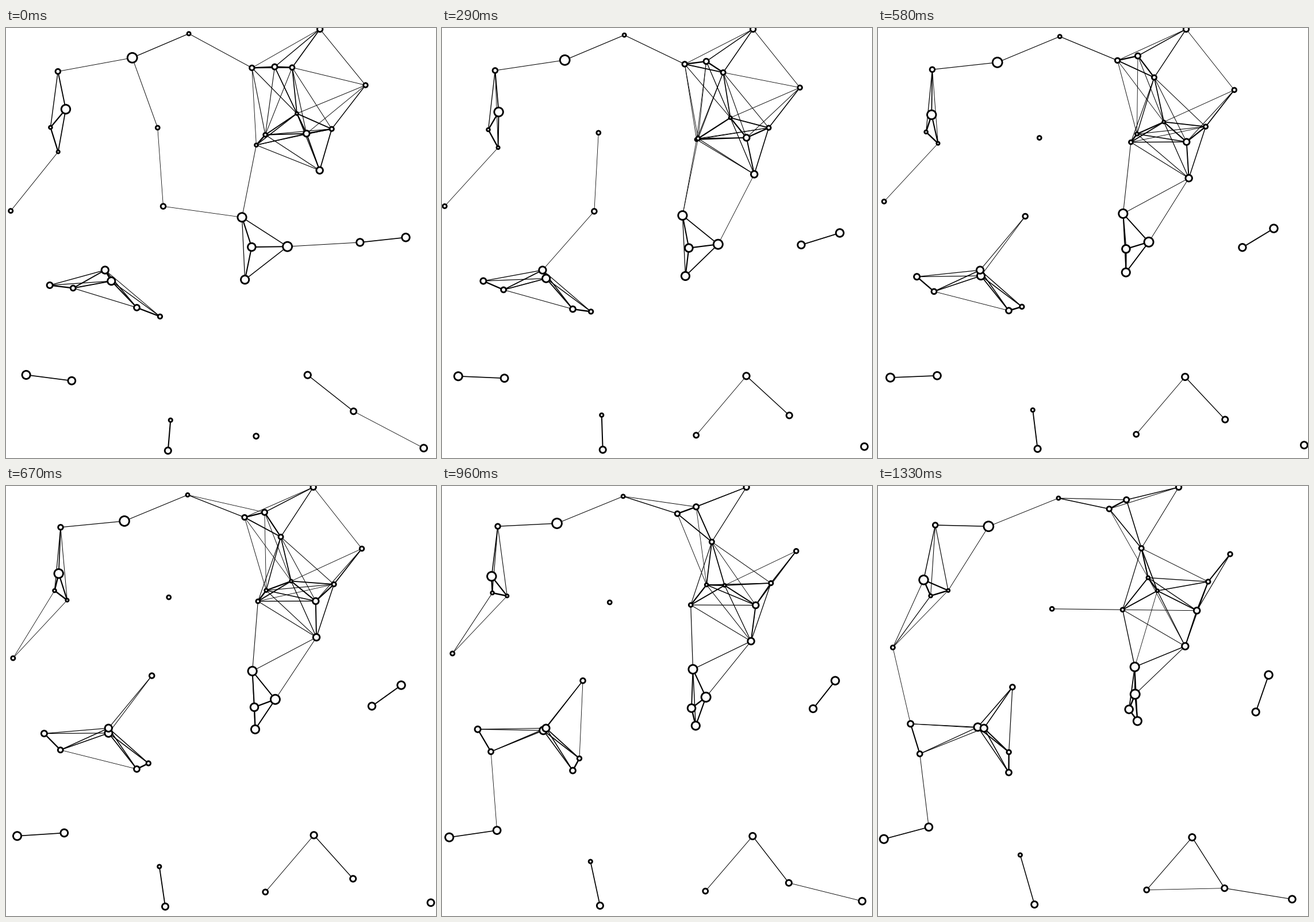
A matplotlib script that plays this animation: 748x748 px, repeating every 1.37 s.

```python
import matplotlib.pyplot as plt
import numpy as np
from matplotlib.animation import FuncAnimation
from matplotlib.collections import LineCollection

SIZE = 748             # stage side in pixels
PX = 0.72              # points per pixel at 100 dpi
REACH = 138.5          # nodes closer than this are linked
STEPS = 32             # moves in one loop
STEPS_PER_TICK = 0.24  # 24 moves per second
TICKS, TICK_MS = 137, 10


def band(speed, smallest, largest, *nodes):
    """Nodes (x, y, heading) at mid-loop that share a speed, sorted by size."""
    x, y, heading = np.array(nodes).T
    angle = np.radians(heading)
    size = np.linspace(smallest, largest, len(nodes))
    return np.column_stack([x, y, speed * np.cos(angle), speed * np.sin(angle), size])


# Speed is in pixels per loop; walls fold paths that would leave the stage.
nodes = np.vstack([
    band(56, 2.8, 4.6, (452.6, 181.6, -52), (266.8, 662, -134), (283.2, 193.6, 46),
         (247.8, 482.4, -136), (478, 88.5, 135), (253.7, 330, 135), (449.8, 45.8, -129)),
    band(46, 2.6, 8, (106.4, 198.6, -47), (-5.3, 299.5, -126), (94.7, 459.2, 163),
         (538.7, 200.2, 46), (636.5, 383, 26), (433.5, 423.3, -39), (468.4, 371.2, -157)),
    band(39, 2.5, 7.6, (496, 165.5, 121), (438.3, 200.5, 131), (415, 54.6, -131),
         (66.4, 430.6, -120), (745.2, 724.8, -18), (687.5, 346.5, -114), (428.6, 322, -22)),
    band(33, 4.4, 8.4, (451.2, 706.3, -13), (603.7, 683.2, 93), (540, 263.2, 110),
         (101.3, 603.5, -142), (19.5, 608.8, 161), (91.7, 152.3, 138), (206, 61, 146)),
    band(23, 2.8, 6.6, (84.5, 182, 52), (619, 109, 124), (534.6, 2, 180),
         (535.6, 607.4, 19), (178.4, 429.8, -115)),
    band(12, 3, 6.8, (316, 15.5, 110), (570.5, 171, -50), (95, 71.8, -39),
         (227.5, 492.4, 90), (277, 731.6, -143), (178.3, 421.2, 1), (432, 384.8, 39)),
])
middle, travel, radius = nodes[:, :2], nodes[:, 2:4], nodes[:, 4:]
first, second = np.triu_indices(len(nodes), 1)


def positions(step):
    """Straight drift that bounces when a ring touches a wall."""
    p = middle + travel * (step / STEPS - 0.5)
    low, high = radius, SIZE - radius
    p = np.where(travel < 0, low + abs(p - low), p)
    return np.where(travel > 0, high - abs(high - p), p)


fig = plt.figure(figsize=(SIZE / 100, SIZE / 100), dpi=100, facecolor="white")
ax = fig.add_axes([0, 0, 1, 1])
ax.set(xlim=(0, SIZE), ylim=(SIZE, 0))
ax.axis("off")

links = LineCollection([], colors="black", zorder=1, snap=False)
ax.add_collection(links, autolim=False)
rings = ax.scatter(*middle.T, s=(2 * radius[:, 0] * PX) ** 2, facecolors="white",
                   edgecolors="black", linewidths=2.9 * PX, zorder=2, snap=False)
ax.set(xlim=(0, SIZE), ylim=(SIZE, 0))


def draw(tick):
    # The small offset keeps each move on its nearest whole tick.
    p = positions(int((tick + 0.49) * STEPS_PER_TICK))
    gap = np.hypot(*(p[first] - p[second]).T)
    near = gap < REACH
    links.set_segments(np.stack([p[first[near]], p[second[near]]], axis=1))
    links.set_linewidths((0.8 + 2.1 * (1 - gap[near] / REACH)) * PX)
    rings.set_offsets(p)
    return links, rings


anim = FuncAnimation(fig, draw, frames=TICKS, interval=TICK_MS,
                     repeat=True, repeat_delay=0, blit=False)
plt.show()
```
